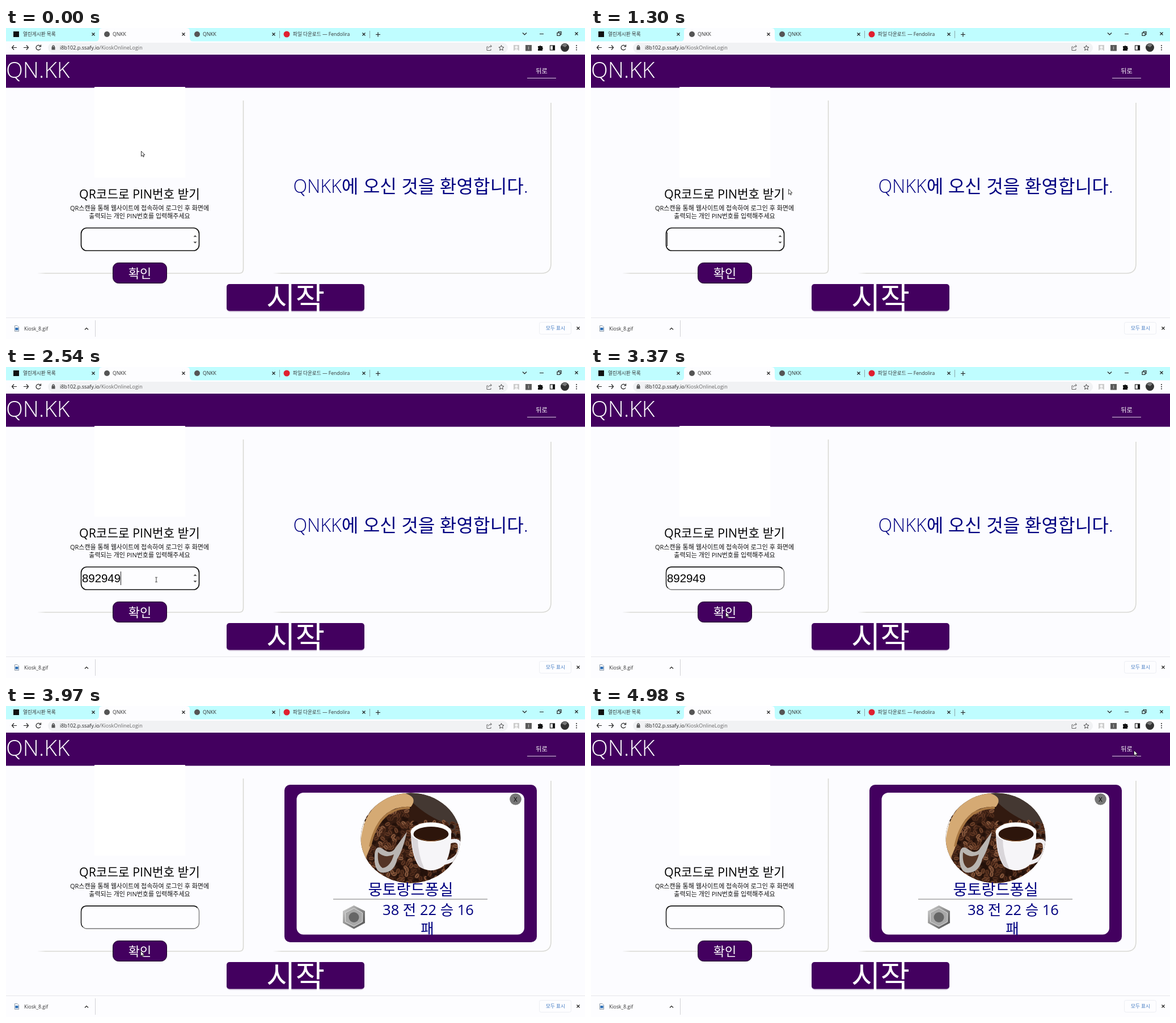
These frames come from a looping animation (1021 by 549 pixels, 5040 ms). An HTML page:

```html
<!DOCTYPE html>
<html lang="ko">
<head>
<meta charset="utf-8">
<title>Kiosk login</title>
<style>
  html, body { margin: 0; width: 100%; height: 100%; overflow: hidden; background: #fcfcff; }
  svg { position: absolute; left: 0; top: 0; width: 1021px; height: 549px; }
  text { font-family: "Open Sans", "Noto Sans CJK KR", "Noto Sans CJK", sans-serif; white-space: pre; }
  .mid { text-anchor: middle; }
  .ui { font-size: 8.6px; fill: #333; }
  .big { font-weight: 350; }
  .purple { fill: #43005f; }
  .navy { fill: #000080; }
  .line { fill: none; stroke: #222; stroke-width: 1.2; }

  .anim { animation: 5040ms step-end infinite; }
  #focus { animation-name: focus; }
  #blur { animation-name: blur; }
  #card { animation-name: card; }
  #arrow { animation-name: arrow; }
  #beam { animation-name: beam; }
  #mouse { animation: move 5040ms infinite; }

  #pin {
    position: absolute; left: 134px; top: 361px; height: 24px; width: 0; overflow: hidden;
    border-right: 1px solid transparent; white-space: nowrap;
    font: 20.4px/24px "Liberation Sans", Arial, sans-serif; color: #000;
    animation: type 5040ms infinite, caret 5040ms step-end infinite;
  }

  @keyframes type {
    0% { width: 0; animation-timing-function: step-end; }
    36.51% { width: 0; animation-timing-function: steps(6, jump-start); }
    48.41% { width: 68.1px; animation-timing-function: step-end; }
    72.22%, 100% { width: 0; }
  }
  @keyframes caret {
    0% { border-color: transparent; }
    .79% { border-color: #222; }
    66.87%, 100% { border-color: transparent; }
  }
  @keyframes focus { 0% { opacity: 1; } 66.87%, 100% { opacity: 0; } }
  @keyframes blur { 0% { opacity: 0; } 66.87%, 100% { opacity: 1; } }
  @keyframes card { 0% { opacity: 0; } 72.22%, 100% { opacity: 1; } }
  @keyframes arrow { 0% { opacity: 1; } 32.74% { opacity: 0; } 52.2%, 100% { opacity: 1; } }
  @keyframes beam { 0% { opacity: 0; } 32.74% { opacity: 1; } 52.2%, 100% { opacity: 0; } }
  @keyframes move {
    0%, .6% { transform: translate(238px, 217px); animation-timing-function: ease-in-out; }
    10% { transform: translate(348px, 283px); }
    25.6% { transform: translate(348px, 284px); animation-timing-function: ease-in-out; }
    35.91%, 50.2% { transform: translate(265px, 375px); animation-timing-function: ease-in-out; }
    56.55% { transform: translate(246px, 477px); animation-timing-function: ease-in-out; }
    62.9%, 82% { transform: translate(237px, 432px); animation-timing-function: ease-in-out; }
    91.47%, 100% { transform: translate(957px, 78px); }
  }
</style>
</head>
<body>
<svg viewBox="0 0 1021 549">
  <defs>
    <path id="x" class="line" d="M-2.5-2.5 2.5 2.5M2.5-2.5-2.5 2.5"/>
    <clipPath id="round"><ellipse cx="713.5" cy="233" rx="88" ry="79.5"/></clipPath>
    <linearGradient id="silver" x2="1" y2="1">
      <stop stop-color="#d8d8d8"/><stop offset=".5" stop-color="#8c8c8c"/><stop offset="1" stop-color="#4c4c4c"/>
    </linearGradient>
    <linearGradient id="fadeL" gradientUnits="userSpaceOnUse" x1="54" x2="70" y1="0" y2="0">
      <stop stop-color="#d9d9d4" stop-opacity="0"/><stop offset="1" stop-color="#d9d9d4"/>
    </linearGradient>
    <linearGradient id="fadeR" gradientUnits="userSpaceOnUse" x1="470" x2="486" y1="0" y2="0">
      <stop stop-color="#d9d9d4" stop-opacity="0"/><stop offset="1" stop-color="#d9d9d4"/>
    </linearGradient>
  </defs>

  <!-- tab strip -->
  <rect width="1021" height="24" fill="#bffdff"/>
  <path d="M158 24Q164 24 164 17V6Q164 0 170 0H318Q324 0 324 6V17Q324 24 330 24Z" fill="#fdfdff"/>
  <rect x="13" y="6" width="10" height="10" fill="#111"/>
  <circle cx="178" cy="11" r="5" fill="#555"/>
  <circle cx="337" cy="11" r="5" fill="#555"/>
  <circle cx="495" cy="11" r="5.5" fill="#e0202f"/>
  <g class="ui">
    <text x="30" y="14">열린게시판 목록</text>
    <text x="188" y="14">QNKK</text>
    <text x="347" y="14">QNKK</text>
    <text x="506" y="14">파일 다운로드 — Fendolira</text>
  </g>
  <path d="M482.5 5V18M641.5 5V18" stroke="#89a6aa"/>
  <use href="#x" x="154" y="11"/><use href="#x" x="313" y="11"/>
  <use href="#x" x="472" y="11"/><use href="#x" x="631" y="11"/>
  <path class="line" d="M652 11.5H660M656 7.5V15.5M941 10.5H948M972 8.5H977V13.5H972ZM974 8V6.500H979V11.500H977"/>
  <path class="line" d="M911 8.500 914.500 12 918 8.500" stroke-width="1"/>
  <use href="#x" x="1006" y="10"/>

  <!-- toolbar -->
  <rect y="23.500" width="1021" height="24" fill="#fdfdff"/>
  <rect x="74" y="26" width="811" height="18" rx="9" fill="#f1f2f4"/>
  <path class="line" d="M19 34.500H10.500M14 30.500 10.500 34.500 14 38.500"/>
  <path class="line" d="M31 34.500H39.500M36 30.500 39.500 34.500 36 38.500" stroke="#aaa"/>
  <path class="line" d="M60.500 32A4.200 4.200 0 1 0 61 36.500M61.500 29.500V33H58"/>
  <rect x="80.500" y="33.500" width="6" height="5" fill="#555"/>
  <path class="line" d="M82 34V32Q83.500 29.500 85 32V34" stroke="#555"/>
  <text x="95" y="38" font-size="9" fill="#222">i8b102.p.ssafy.io<tspan fill="#666">/KioskOnlineLogin</tspan></text>
  <g class="line" stroke-width="1">
    <path d="M850 33H848V39.500H855V37M850 36Q851 32 856 32M854 30 856.500 32 854 34.500" stroke="#666" stroke-width="1"/>
    <path d="M873.500 30.500 874.800 33.600 878 34 875.500 36.200 876.300 39.400 873.500 37.700 870.700 39.400 871.500 36.200 869 34 872.200 33.600Z" stroke="#444" stroke-width="1"/>
    <rect x="959.500" y="31" width="8" height="8"/>
  </g>
  <rect x="895" y="30" width="10" height="10" fill="#ccc"/>
  <circle cx="900" cy="34" r="2.500" fill="#f4f4f4"/><path d="M896 40Q900 34 904 40Z" fill="#f4f4f4"/>
  <rect x="916" y="30" width="11" height="10.500" fill="#5b5b5b"/>
  <path d="M921.500 32.500V38" stroke="#bbb"/>
  <path d="M938 32H940.500A1.700 1.700 0 0 1 943.500 32H946V34.500A1.700 1.700 0 0 1 946 37.500V40H938V37A1.500 1.500 0 0 0 938 34.500Z" fill="#111"/>
  <rect x="964" y="31" width="4" height="8" fill="#111"/>
  <circle cx="985.500" cy="34.500" r="7.500" fill="#333"/>
  <path d="M980 31Q985 25 990 30L986 34Z" fill="#777"/>
  <g fill="#222"><circle cx="1006" cy="31" r="1"/><circle cx="1006" cy="34.700" r="1"/><circle cx="1006" cy="38.400" r="1"/></g>

  <!-- page header -->
  <rect class="purple" y="47" width="1021" height="58.500"/>
  <text class="big" x="0" y="88" font-size="39" fill="#fff">QN.KK</text>
  <text class="mid" x="944.500" y="79.500" font-size="11.200" fill="#fff">뒤로</text>
  <path d="M919 88.500H970" stroke="#d9cce0"/>

  <!-- panels -->
  <g fill="none" stroke-width="1.600">
    <path d="M56 433H411Q418.500 433 418.500 425.500V128" stroke="url(#fadeL)"/>
    <path d="M471 433H944Q961 433 961 416V132" stroke="url(#fadeR)"/>
  </g>
  <rect x="156" y="104" width="160" height="160" fill="#fff"/>
  <text class="mid" x="235.500" y="301" font-size="21.300">QR코드로 PIN번호 받기</text>
  <g class="mid" font-size="11" fill="#111">
    <text x="235.500" y="322">QR스캔을 통해 웹사이트에 접속하여 로그인 후 화면에</text>
    <text x="235.500" y="336">출력되는 개인 PIN번호를 입력해주세요</text>
  </g>
  <text class="mid big navy" x="713.500" y="290.500" font-size="32.200">QNKK에 오신 것을 환영합니다.</text>

  <!-- PIN field -->
  <g id="focus" class="anim">
    <rect x="132.500" y="353" width="208" height="40" rx="10" fill="#fdfdff" stroke="#111" stroke-width="1.700"/>
    <path d="M330.500 368.700 333.500 365.700 336.500 368.700ZM330.500 377.200 333.500 380.200 336.500 377.200Z" fill="#444"/>
  </g>
  <g id="blur" class="anim" fill="none" stroke-width="1.300">
    <rect x="132.500" y="353" width="208" height="40" rx="10" fill="#fdfdff" stroke="#777"/>
    <path d="M135.500 390Q132.500 387 132.500 383V363Q132.500 353 142.500 353H330.500Q335 353 337.500 356" stroke="#111"/>
  </g>

  <!-- buttons -->
  <rect class="purple" x="188.500" y="414.500" width="95" height="36" rx="10" stroke="#1a0024"/>
  <text class="mid" x="236" y="441" font-size="22" fill="#fff">확인</text>
  <rect x="389" y="454" width="243" height="47.500" rx="6" fill="#dcd3e2"/>
  <rect class="purple" x="389" y="452" width="243" height="47.500" rx="5"/>
  <text class="mid big" x="510.500" y="497.500" font-size="56" fill="#fff">시작</text>

  <!-- result card -->
  <g id="card" class="anim">
    <rect class="purple" x="491" y="139" width="445" height="278" rx="10"/>
    <rect x="512.500" y="153" width="401.500" height="250.500" rx="12" fill="#fdfdff"/>
    <g clip-path="url(#round)">
      <rect x="625" y="153" width="177" height="160" fill="#321a10"/>
      <path d="M700 153H802V240L770 205Q735 190 712 165Z" fill="#443832"/>
      <path d="M625 153H668L640 190 625 240Z" fill="#f4ece2"/>
      <g id="beans"></g>
      <path d="M625 245Q628 200 650 178L664 153H700Q728 160 714 178Q690 176 672 189Q648 207 642 250L632 275H620Z" fill="#d5aa74"/>
      <path d="M642 248Q650 208 674 190Q694 178 712 180" fill="none" stroke="#a97843" stroke-width="4"/>
      <path d="M707 222Q700 254 690 270Q684 296 662 294Q648 290 650 262Q652 244 664 252Q676 262 684 254Z" fill="#b9b5b2"/>
      <path d="M656 258Q668 270 684 262Q678 284 664 286Q654 280 656 258Z" fill="#553526"/>
      <path d="M781 240Q803 232 800 254Q797 272 772 277" fill="none" stroke="#f0eff2" stroke-width="7"/>
      <path d="M714 222H785Q786 262 772 282Q750 298 728 283Q714 262 714 222Z" fill="#f6f5f8"/>
      <path d="M715 228Q716 262 729 283L738 288Q726 262 726 232Z" fill="#d9d6da"/>
      <ellipse cx="749.500" cy="223" rx="36" ry="17.500" fill="#fff"/>
      <ellipse cx="749.500" cy="226" rx="31" ry="13" fill="#2d150b"/>
      <path d="M722 230Q749 246 777 230Q760 240 749.500 239Q735 239 722 230Z" fill="#9c6233"/>
    </g>
    <circle cx="898.500" cy="164.500" r="10.300" fill="#777"/>
    <text class="mid" x="898.500" y="168.500" font-size="11">X</text>
    <path d="M577 341H849" stroke="#777"/>
    <g class="mid navy">
      <text x="713.500" y="333.500" font-size="27.200">뭉토랑드퐁실</text>
      <text x="744.500" y="368.500" font-size="25.500">38 전 22 승 16</text>
      <text x="743" y="401.500" font-size="25.500">패</text>
    </g>
    <path d="M613.500 352 633 362V383L613.500 393.500 594 383V362Z" fill="url(#silver)"/>
    <path d="M613.500 357 628.500 365V381L613.500 389 598.500 381V365Z" fill="#a8a8a8" stroke="#dedede"/>
    <circle cx="613.500" cy="373" r="9" fill="#666"/>
  </g>

  <!-- download bar -->
  <rect y="511" width="1021" height="38" fill="#fdfdff"/>
  <path d="M0 511.500H1021" stroke="#e6e6ea"/>
  <path d="M157.500 516V545" stroke="#d2d2d6"/>
  <path d="M15.500 525.500H20L22.500 528V535.500H15.500Z" fill="#fff" stroke="#8a98a8"/>
  <rect x="16.500" y="529" width="5" height="4.500" fill="#2d6fb8"/>
  <text class="ui" x="32" y="533.500">Kiosk_8.gif</text>
  <path class="line" d="M139 532.500 142 529.500 145 532.500"/>
  <rect x="940.500" y="519.500" width="56" height="21" rx="3" fill="none" stroke="#eceef3"/>
  <text class="ui mid" x="969" y="532.500" style="fill:#3f78c0">모두 표시</text>
  <use href="#x" x="1009" y="530"/>
</svg>

<div id="pin">892949</div>

<svg viewBox="0 0 1021 549">
  <g id="mouse">
    <path id="arrow" class="anim" d="M.5.500V9.500L2.600 7.600 4 10.700 5.400 10 4 7H7Z" fill="#fff" stroke="#222" stroke-width=".9"/>
    <path id="beam" class="anim" d="M-2-3.800H2M0-3.800V4.200M-2 4.200H2" fill="none" stroke="#333" stroke-width=".9"/>
  </g>
</svg>

<script>
  // Coffee beans scattered on a jittered grid
  let seed = 7;
  const rand = () => (seed = seed * 16807 % 2147483647) / 2147483647;
  const tones = ['#6b3f28', '#4d2a1a', '#84553a', '#5c3421', '#25120b'];
  let beans = '';
  for (let y = 184; y < 314; y += 7) {
    for (let x = 632; x < 800; x += 8) {
      if (x > 706 && y < 200) continue;
      const px = (x + rand() * 6).toFixed(1), py = (y + rand() * 5).toFixed(1);
      const turn = Math.floor(rand() * 180), tone = tones[Math.floor(rand() * 5)];
      beans += `<g transform="translate(${px} ${py}) rotate(${turn})">` +
        `<ellipse rx="4.600" ry="3.200" fill="${tone}"/><path d="M-3 0H3" stroke="#1f0e08" stroke-width=".8"/></g>`;
    }
  }
  document.getElementById('beans').innerHTML = beans;
</script>
</body>
</html>
```
